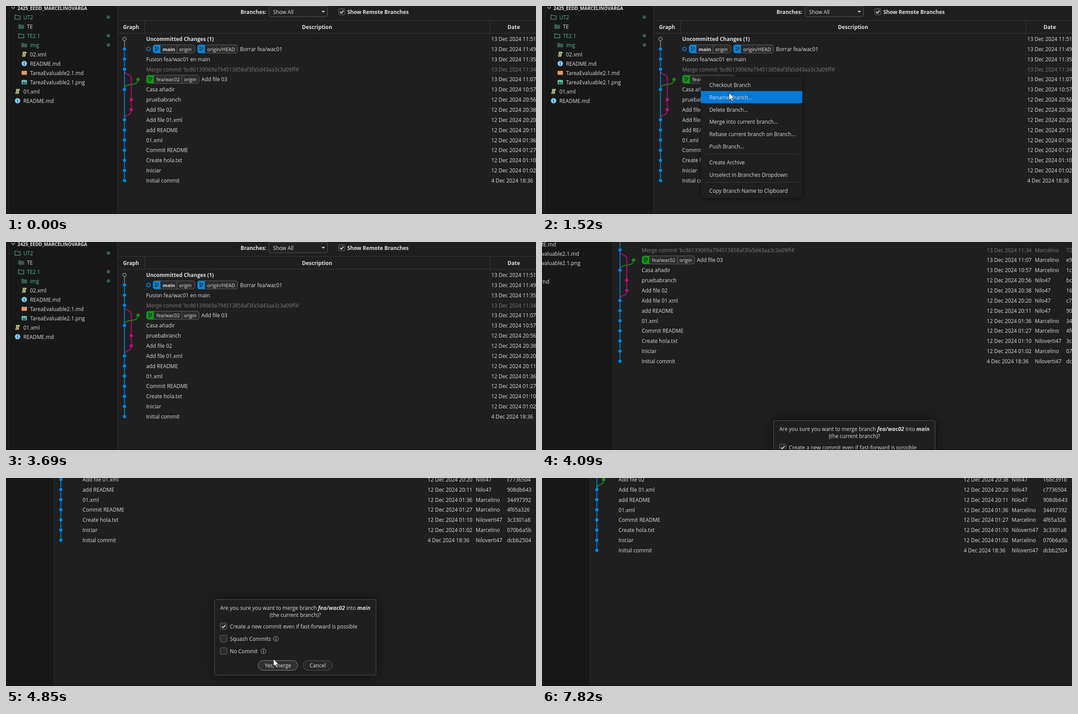
These frames come from a looping animation (1191x470 px, 8000 ms). An HTML page:

```html
<!DOCTYPE html>
<html lang="en">
<head>
<meta charset="utf-8">
<title>Merging a branch</title>
<style>
  html, body { margin: 0; width: 100%; height: 100%; overflow: hidden; background: #1f1f1f; }
  svg { display: block; }
  text { font: 11.8px "Open Sans", "Noto Sans", sans-serif; fill: #dedede; white-space: pre; }
  .b { font-weight: 700; }
  .i { font-style: italic; }
  .mid { text-anchor: middle; }
  .muted { fill: #7a7a7a; }
  .new { fill: #4fb99b; }
  .ref { font-size: 11px; }
  .branch { font-size: 12.3px; font-weight: 700; font-style: italic; }
  .root { font-size: 10.4px; font-weight: 700; }
  .shadow { filter: drop-shadow(0 0 14px rgba(0, 0, 0, .5)); }
  .menu-shadow { filter: drop-shadow(0 1px 4px rgba(0, 0, 0, .6)); }
</style>
</head>
<body>
<svg id="stage" width="1191" height="470" viewBox="0 0 1191 470"></svg>
<script>
const LOOP = 8000, ROW = 320 / 14, TOP = 74.4;
const BLUE = '#0085d9', PINK = '#bd0d7a', GREEN = '#149218';
const PAN = { x: 143, y: 254 };

// Text is placed by its middle, on whole-pixel baselines.
const text = (x, y, str, cls = '') => `<text x="${x}" y="${Math.round(y + 4.6)}" class="${cls}">${str}</text>`;
const rect = (x, y, w, h, fill, extra = '') =>
  `<rect x="${x}" y="${y}" width="${w}" height="${h}" fill="${fill}" ${extra}/>`;
const dot = (x, y, r, fill, extra = '') => `<circle cx="${x}" cy="${y}" r="${r}" fill="${fill}" ${extra}/>`;
const path = (d, stroke, width = 1, extra = '') =>
  `<path d="${d}" fill="none" stroke="${stroke}" stroke-width="${width}" ${extra}/>`;
const at = (x, y, body) => `<g transform="translate(${x} ${y})">${body}</g>`;
const rowY = i => TOP + ROW * i;

// ---- Explorer
const folder = (fill, stroke) =>
  `<path d="M-6 -4.5h4.2l1.6 1.7H6V5H-6z" fill="${fill}" stroke="${stroke}" stroke-linejoin="round"/>`;
const icons = {
  open: folder('none', '#69c7ad'),
  closed: folder('#375c4c', '#375c4c'),
  xml: '<path d="M-3.5 -5.5H5V-2H3V3.5Q3 5.5 1 5.5H-5V2.5H-3.5z" fill="#c9c58a"/>' +
    path('M-1.5 -2.5H1.5M-1.5 0H1.5M-3 3.5H1', '#33331f'),
  info: dot(0, 0, 6, '#81d0f5') + path('M0 -3.5V-1.8M0 -.8V3.5', '#16384a', 1.6),
  md: rect(-6, -4.5, 12, 9, '#e89a5e', 'rx="1"'),
  img: rect(-6, -5, 12, 10, '#65b8ac', 'rx="1.5"') + '<path d="M-5 3.5L-1.5 -1 1 1.5 3 0 5 3.5z" fill="#1d4a46"/>'
};
const files = [
  [26, 'open', 'UT2', 1], [34, 'closed', 'TE'], [34, 'open', 'TE2.1', 1], [41, 'closed', 'img', 1],
  [41, 'xml', '02.xml'], [41, 'info', 'README.md'], [41, 'md', 'TareaEvaluable2.1.md'],
  [41, 'img', 'TareaEvaluable2.1.png'], [26, 'xml', '01.xml'], [26, 'info', 'README.md']
];
const explorer = rect(0, 0, 250, 800, '#181818') + rect(6, 0, 1, 800, '#2b2b2b') + rect(250, 0, 1, 800, '#2e2e2e') +
  path('M12 2l4 4 4-4', '#ccc', 1.2) + text(26, 4, '2425_EEDD_MARCELINOVARGA', 'root') +
  files.map(([x, icon, name, changed], i) => {
    const y = 25 + 21 * i;
    return at(x, y, icons[icon]) + text(x + 13, y, name, changed ? 'new' : '') +
      (changed ? dot(230, y, 4, '#3a5a4b') : '');
  }).join('');

// ---- Toolbar and table head
const checkbox = (x, y, size, on) =>
  rect(x, y, size, size, '#2c2c2c', 'stroke="#666" rx="2.5"') +
  (on ? path(`M${x + size * .24} ${y + size * .52}l${size * .2} ${size * .2} ${size * .34} ${-size * .42}`, '#eee', 1.7) : '');
const head = text(527, 13, 'Branches:', 'b') +
  rect(590.5, .5, 132, 24, '#222', 'rx="4" stroke="#555"') + text(600, 13, 'Show All') +
  '<path d="M709 11h8l-4 4z" fill="#ccc"/>' +
  checkbox(747.5, 6, 14, true) + text(767, 13, 'Show Remote Branches', 'b') +
  rect(251, 32, 1300, 1, '#383838') + rect(251, 61, 1300, 1, '#383838') +
  rect(311, 32, 1, 29, '#383838') + rect(1087, 32, 1, 29, '#383838') +
  text(281, 47, 'Graph', 'b mid') + text(699, 47, 'Description', 'b mid') + text(1141, 47, 'Date', 'b mid');

// ---- Commits
const DEV = 'Marcelino', SHORT = 'Nilo47', LONG = 'Niloverti47';
const commits = [
  ['Uncommitted Changes (1)', '13 Dec 2024 11:51', '*', '*'],
  ['Borrar fea/wac01', '13 Dec 2024 11:49', DEV, '5d20c7e1'],
  ['Fusion fea/wac01 en main', '13 Dec 2024 11:35', DEV, 'a41f09b3'],
  ["Merge commit 'bc86139069a794513858af3fa5d43aa3c3a09ff4'", '13 Dec 2024 11:34', DEV, '72e6d05c'],
  ['Add file 03', '13 Dec 2024 11:07', DEV, 'e90b134f'],
  ['Casa añadir', '13 Dec 2024 10:57', DEV, '1c58fa26'],
  ['pruebabranch', '12 Dec 2024 20:56', SHORT, 'bc861390'],
  ['Add file 02', '12 Dec 2024 20:38', SHORT, '16bc391b'],
  ['Add file 01.xml', '12 Dec 2024 20:20', SHORT, 'c7736504'],
  ['add README', '12 Dec 2024 20:11', SHORT, '908db643'],
  ['01.xml', '12 Dec 2024 01:36', DEV, '34497392'],
  ['Commit README', '12 Dec 2024 01:27', DEV, '4f65a326'],
  ['Create hola.txt', '12 Dec 2024 01:10', LONG, '3c3301a8'],
  ['Iniciar', '12 Dec 2024 01:02', DEV, '070b6a5b'],
  ['Initial commit', '4 Dec 2024 18:36', LONG, 'dcbb2504']
];
const badge = (x, y, w, color, label) =>
  rect(x + .5, y - 9.5, w - 1, 18.5, '#2b2b2b', 'rx="5" stroke="#666"') +
  `<path d="M${x + 17} ${y - 9.5}h-12q-5 0 -5 5v8.5q0 5 5 5h12z" fill="${color}"/>` +
  at(x + 8.5, y, path('M-2 -4V5M-2 3Q3 2 3 -2', '#10222e', 1.4) +
    [[-2, -4], [3, -3]].map(([a, b]) => dot(a, b, 1.6, '#10222e')).join('')) + label;
const refs = badge(330, rowY(1), 95, BLUE,
    text(352, rowY(1), 'main', 'ref b') + rect(384, rowY(1) - 9, 1, 18, '#666') + text(389, rowY(1), 'origin', 'ref i')) +
  badge(430, rowY(1), 91, BLUE, text(452, rowY(1), 'origin/HEAD', 'ref')) +
  badge(315.5, rowY(4), 119, GREEN,
    text(338, rowY(4), 'fea/wac02', 'ref') + rect(395, rowY(4) - 9, 1, 18, '#666') + text(400, rowY(4), 'origin', 'ref i')) +
  dot(320, rowY(1), 4, 'none', `stroke="${BLUE}" stroke-width="2"`);
const indent = { 1: 526, 4: 439 };
const rows = commits.map(([msg, date, who, hash], i) => {
  const y = rowY(i), tone = i === 3 ? 'muted' : '';
  return text(indent[i] || 315, y, msg, i ? tone : 'b') + text(1090.5, y, date, tone) +
    text(1198.5, y, who, tone) + text(1269, y, hash, tone);
}).join('');

const lanes = [1, 2, 3].map(n => 251 + 15.25 * n);
const curve = (x1, y1, x2, y2) => `C${x1} ${y1 + ROW * .8} ${x2} ${y2 - ROW * .8} ${x2} ${y2}`;
const node = (lane, i, color) => dot(lanes[lane], rowY(i), 4.1, color, 'stroke="#1f1f1f" stroke-opacity=".75"');
const graph =
  path(`M${lanes[2]} ${rowY(4)}` + curve(lanes[2], rowY(4), lanes[0], rowY(5)), GREEN, 1.9) +
  `<g id="side" color="${PINK}">` +
  path(`M${lanes[0]} ${rowY(3)}` + curve(lanes[0], rowY(3), lanes[1], rowY(4)) + `V${rowY(7)}` +
    curve(lanes[1], rowY(7), lanes[0], rowY(8)), 'currentColor', 1.9) +
  [6, 7].map(i => node(1, i, 'currentColor')).join('') + '</g>' +
  path(`M${lanes[0]} ${rowY(0)}V${rowY(1)}`, '#808080', 1.9) +
  path(`M${lanes[0]} ${rowY(1)}V${rowY(14)}`, BLUE, 1.9) +
  dot(lanes[0], TOP, 3.8, '#1f1f1f', 'stroke="#808080" stroke-width="1.9"') +
  commits.map((_, i) => [0, 4, 6, 7].includes(i) ? '' : node(0, i, BLUE)).join('') +
  node(2, 4, GREEN);

// ---- Context menu
const items = [
  [178.5, 'Checkout Branch'], [206, 'Rename Branch...'], [234, 'Delete Branch...'],
  [261.5, 'Merge into current branch...'], [289, 'Rebase current branch on Branch...'], [317, 'Push Branch...'],
  [353, 'Create Archive'], [381, 'Unselect in Branches Dropdown'], [417, 'Copy Branch Name to Clipboard']
];
const menu = rect(357, 160, 228, 274, '#1f1f1f', 'class="menu-shadow"') +
  rect(357, 0, 228, 27.5, '#0078d4', 'id="pick"') +
  rect(366, 334, 210, 1, '#3c3c3c') + rect(366, 398, 210, 1, '#3c3c3c') +
  items.map(([y, label]) => text(376, y, label)).join('');

// ---- Merge dialog, laid out in its panned position
const hint = (x, y) => dot(x, y, 5.5, 'none', 'stroke="#bbb"') + path(`M${x} ${y - 3}v1.5M${x} ${y - .5}v3.5`, '#ccc', 1.4);
const button = (x, w, label, fill, stroke) =>
  rect(x + .5, 412.5, w - 1, 22, fill, `rx="11" stroke="${stroke}"`) + text(x + w / 2, 423.5, label, 'mid');
const options = [['Create a new commit even if fast-forward is possible', true], ['Squash Commits'], ['No Commit']];
const branch = name => `<tspan class="branch">${name}</tspan>`;
const dialog = at(PAN.x, PAN.y,
  rect(468.5, 274.5, 363, 171, '#1f1f1f', 'rx="4" stroke="#545454" class="shadow"') +
  text(650, 293, `Are you sure you want to merge branch ${branch('fea/wac02')} into ${branch('main')}`, 'mid') +
  text(650, 309, '(the current branch)?', 'mid') +
  options.map(([label, on], i) => checkbox(481.5, 327.5 + 28 * i, 15, on) + text(503, 335 + 28 * i, label)).join('') +
  hint(606.5, 363.5) + hint(578.5, 391.5) +
  button(566, 90, 'Yes, merge', '#303030', '#8a8a8a') + button(667, 67, 'Cancel', '#272727', '#555'));

// ---- Pointer
const pointer = '<path id="arrow" d="M0 0V16.2L3.7 12.8 6.2 18.6 8.8 17.5 6.4 11.8H11.5Z" fill="#fff" stroke="#111" stroke-width=".8"/>' +
  '<path id="hand" d="M-1.5 1Q0 -1.5 1.5 1V8Q3 6.6 4.3 8.4 6 7.3 7.2 9 10 8 10 11V15Q9.5 17.5 8 19V21H0V19Q-2 17.5 -5 12.5 -5.2 10 -2.8 11L-1.5 12.5Z" fill="#fff" stroke="#111" stroke-width=".8"/>';

document.getElementById('stage').innerHTML = rect(0, 0, 1191, 470, '#1f1f1f') +
  `<g id="world">${explorer}${head}<g id="table">` +
  rect(251, 0, 1300, ROW, '#808080', 'id="hover" opacity=".12"') + `${graph}${refs}${rows}</g>` +
  `<g id="menu">${menu}</g><g id="dialog">${dialog}</g></g>` +
  rect(0, 468.5, 1191, 1.5, '#171717') +
  `<g id="cursor">${dot(0, 0, 11.5, '#ffff00', 'id="press" opacity=".55"')}${pointer}</g>`;

const el = {};
for (const id of ['world', 'table', 'side', 'hover', 'menu', 'pick', 'dialog', 'cursor', 'press', 'arrow', 'hand'])
  el[id] = document.getElementById(id);

// ---- Motion
const easeOut = p => 1 - (1 - p) ** 3;
const easeInOut = p => p * p * (3 - 2 * p);
const linear = p => p;
// Each stop is reached with the easing it names.
const route = [
  [100, 1195, 440], [780, 359, 162, easeOut], [1350, 359, 162, linear], [1520, 420, 196, linear],
  [2150, 472, 264, easeOut], [2560, 472, 264, linear], [2880, 655, 450, easeInOut], [3360, 604, 64, easeInOut],
  [3690, 606, -22, linear], [4020, 606, -22, linear], [4021, 640, 480, linear], [4400, 640, 480, linear],
  [4820, 601, 409, easeOut], [4850, 601, 409, linear], [5100, 522, 440, easeInOut], [5350, 627, 390, easeInOut],
  [5650, 609, 422, easeOut], [6960, 609, 422, linear], [7600, 421, 25, easeInOut], [7820, 419, -22, linear]
];
function pointerAt(t) {
  const next = route.findIndex(stop => stop[0] > t);
  if (next < 1) return { x: -50, y: -50 };
  const [t0, x0, y0] = route[next - 1], [t1, x1, y1, ease] = route[next];
  const p = ease((t - t0) / (t1 - t0));
  return { x: x0 + (x1 - x0) * p, y: y0 + (y1 - y0) * p };
}

const during = (t, a, b) => t >= a && t < b;
const show = (node, on) => node.setAttribute('display', on ? 'inline' : 'none');
const move = (node, x, y) => node.setAttribute('transform', `translate(${x} ${y})`);

function render(t) {
  const { x, y } = pointerAt(t);
  const p = Math.min(1, Math.max(0, (t - 4020) / 800));
  const panX = Math.round(PAN.x * (1 - (1 - p) ** 10.8));
  const panY = Math.round(PAN.y * (1 - (1 - p) ** 7.3));
  const merged = t >= 7250, menuOpen = during(t, 1040, 2560), dialogOpen = during(t, 2560, 6960);
  const shift = merged ? Math.round(ROW) : 0;

  move(el.world, -panX, -panY);
  move(el.table, 0, shift);
  el.side.setAttribute('color', merged ? GREEN : PINK);

  const row = Math.round((y + panY - shift - TOP) / ROW);
  show(el.hover, !menuOpen && !dialogOpen && y > 0 && row >= 0 && row < commits.length);
  el.hover.setAttribute('y', rowY(row) - ROW / 2);

  show(el.menu, menuOpen);
  const picked = items.find(([c]) => Math.abs(y - c) <= 13.8);
  show(el.pick, menuOpen && picked);
  if (picked) el.pick.setAttribute('y', picked[0] - 13.9);

  show(el.dialog, dialogOpen);
  move(el.cursor, x.toFixed(1), y.toFixed(1));
  const onButton = during(t, 4820, 6960) && x > 566 && x < 656 && y > 412 && y < 435;
  show(el.hand, onButton);
  show(el.arrow, !onButton);
  show(el.press, during(t, 950, 1080) || during(t, 2420, 2560) || during(t, 6830, 6900));
}

const start = performance.now();
function tick() {
  render((performance.now() - start) % LOOP);
  requestAnimationFrame(tick);
}
tick();
</script>
</body>
</html>
```
